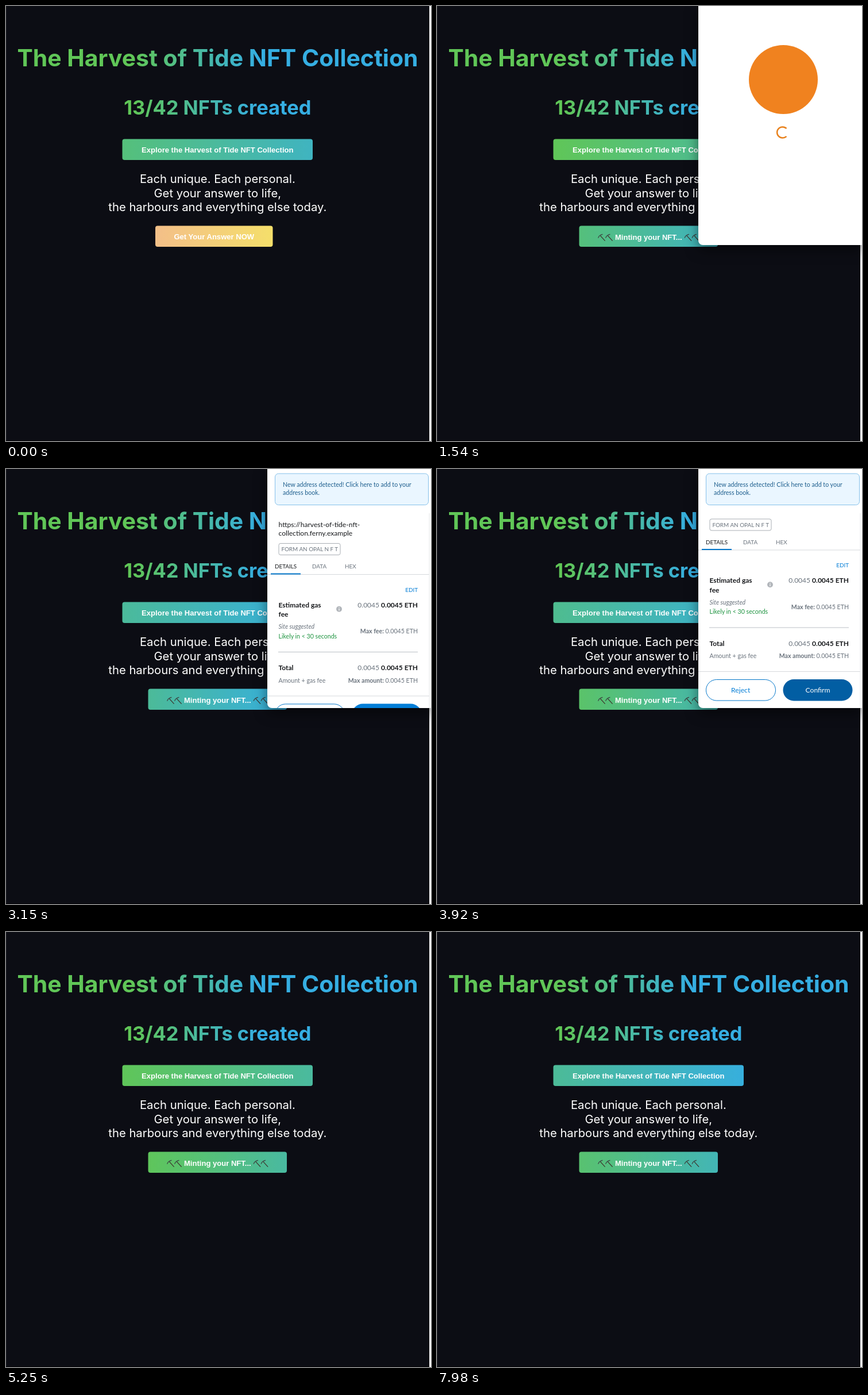
An HTML page that plays this animation: 740 px wide and 757 px high, repeating every 8000 ms.

```html
<!DOCTYPE html>
<html lang="en">
<head>
<meta charset="utf-8">
<title>Mint page</title>
<style>
  html, body { margin: 0; width: 100%; height: 100%; overflow: hidden; background: #0c0d14; }
  svg { display: block; }
  text { white-space: pre; }
  .head { font-family: Inter, sans-serif; font-weight: 700; fill: url(#headFill); text-anchor: middle; }
  .body { font: 20.25px Inter, sans-serif; fill: #fff; text-anchor: middle; }
  .label { font: bold 13.05px "Liberation Sans", Arial, sans-serif; fill: #fff; }
  .mid { text-anchor: middle; }
  .end { text-anchor: end; }
  #popup { font: 10.6px Lato, sans-serif; fill: #6a737d; filter: drop-shadow(0 8px 11px rgba(0, 0, 0, .5)); }
  .big { font-size: 12px; }
  .small { font-size: 9.9px; }
  .bold { font-weight: 700; }
  .ink { fill: #16181b; }
  .blue { fill: #037dd6; }
  .rule { stroke: #d6d9dc; }
</style>
</head>
<body>
<svg width="740" height="757" viewBox="0 0 740 757">
  <defs>
    <linearGradient id="headFill" gradientUnits="userSpaceOnUse" x1="221" x2="442" y1="0" y2="0">
      <stop stop-color="#60c657"/><stop offset="1" stop-color="#35aee2"/>
    </linearGradient>
    <linearGradient id="exploreFill" gradientUnits="userSpaceOnUse" y1="0" y2="0">
      <stop stop-color="#60c657"/><stop offset="1" stop-color="#35aee2"/>
    </linearGradient>
    <linearGradient id="mintingFill" gradientUnits="userSpaceOnUse" y1="0" y2="0">
      <stop stop-color="#60c657"/><stop offset="1" stop-color="#35aee2"/>
    </linearGradient>
    <linearGradient id="answerFill" gradientUnits="userSpaceOnUse" y1="0" y2="0">
      <stop stop-color="#f3af98"/><stop offset="1" stop-color="#f5ee5c"/>
    </linearGradient>
    <clipPath id="scrollArea"><path d="M455 77H740V416H463a8 8 0 0 1-8-8z"/></clipPath>
    <g id="pick" fill="none" stroke-linecap="round" stroke-width="1.2">
      <path d="M4.5 3.5 12.3 12" stroke="#3d3029"/>
      <path d="M.8 7Q2 2.5 8 1" stroke="#3c4443"/>
    </g>
    <g id="picks"><use href="#pick"/><use href="#pick" x="13"/></g>
  </defs>

  <rect width="740" height="757" fill="#0c0d14"/>
  <path d="M.5 0V757" stroke="#1d1e24"/>
  <path d="M0 756.5H737" stroke="#030305"/>
  <rect x="737" width="3" height="757" fill="#f1f1f3"/>

  <text class="head" x="368.5" y="105" font-size="40.9">The Harvest of Tide NFT Collection</text>
  <text class="head" x="368.3" y="189" font-size="34.4">13/42 NFTs created</text>

  <rect x="202.5" y="231.5" width="331.5" height="36.5" rx="4" fill="url(#exploreFill)"/>
  <text class="label mid" x="368.3" y="254.5">Explore the Harvest of Tide NFT Collection</text>

  <g class="body">
    <text x="368.3" y="308">Each unique. Each personal.</text>
    <text x="368.3" y="332.7">Get your answer to life,</text>
    <text x="368.3" y="357.3">the harbours and everything else today.</text>
  </g>

  <g id="answer">
    <rect x="260" y="382.5" width="204.5" height="36.5" rx="4" fill="url(#answerFill)"/>
    <text class="label mid" x="362.3" y="405.5">Get Your Answer NOW</text>
  </g>
  <g id="minting">
    <rect x="247.5" y="382.5" width="241.5" height="36.5" rx="4" fill="url(#mintingFill)"/>
    <use href="#picks" x="280" y="396.3"/>
    <text class="label" x="310" y="407">Minting your NFT...</text>
    <use href="#picks" x="430.5" y="396.3"/>
  </g>

  <g id="popup">
    <path d="M455 0H740V416H463a8 8 0 0 1-8-8z" fill="#fff"/>
    <g id="loading">
      <circle cx="603" cy="128" r="60" fill="#f0821f"/>
      <path id="spinner" d="M608.5 213.2A9.6 9.6 0 1 0 608.5 226.8" fill="none" stroke="#e8821e" stroke-width="2.5"/>
    </g>
    <g id="details">
      <g clip-path="url(#scrollArea)">
        <g id="scroller">
          <g class="ink" font-size="12.1">
            <text x="474.5" y="101">https://harvest-of-tide-nft-</text>
            <text x="474.5" y="116">collection.ferny.example</text>
          </g>
          <rect x="475" y="129.5" width="107" height="20" rx="3" fill="none" stroke="#a9aeb4"/>
          <text class="small mid" x="528.7" y="143">FORM AN OPAL N F T</text>
          <path class="rule" d="M455 183.5H737"/>
          <path d="M461 182.5H513" stroke="#0376c9" stroke-width="2"/>
          <g class="small">
            <text class="ink" x="468" y="173">DETAILS</text>
            <text x="533" y="173">DATA</text>
            <text x="590" y="173">HEX</text>
            <text class="blue end" x="717" y="213.5">EDIT</text>
          </g>
          <g class="big bold ink">
            <text x="474.5" y="240.5">Estimated gas</text>
            <text x="474.5" y="257">fee</text>
            <text x="474.5" y="350">Total</text>
          </g>
          <circle cx="580" cy="243.7" r="5" fill="#b3b7bc"/>
          <path d="M580 240.7v1.2M580 242.9v3.6" stroke="#fff" stroke-width="1.2"/>
          <text x="474.5" y="278" font-style="italic">Site suggested</text>
          <text x="474.5" y="294.5" fill="#1e9440">Likely in &lt; 30 seconds</text>
          <text class="big end" x="717" y="240.5">0.0045 <tspan class="bold ink">0.0045 ETH</tspan></text>
          <text class="end" x="717" y="286"><tspan class="bold">Max fee:</tspan> 0.0045 ETH</text>
          <path d="M474 318.5H717" stroke="#bbc0c5"/>
          <text class="big end" x="717" y="350">0.0045 <tspan class="bold ink">0.0045 ETH</tspan></text>
          <text x="474.5" y="371.5">Amount + gas fee</text>
          <text class="end" x="717" y="371.5"><tspan class="bold">Max amount:</tspan> 0.0045 ETH</text>
          <path class="rule" d="M455 395H737"/>
          <rect x="468.5" y="409" width="121" height="36.5" rx="18.2" fill="#fff" stroke="#0376c9"/>
          <text class="blue mid" x="528.7" y="431" font-size="12.2">Reject</text>
          <rect id="confirm" x="602.5" y="408.5" width="121" height="37.5" rx="18.7"/>
          <text class="mid" x="663" y="431" font-size="12.2" fill="#fff">Confirm</text>
        </g>
      </g>
      <path d="M737 77V416" stroke="#e6e8ea"/>
      <rect x="468.5" y="8" width="267" height="54.5" rx="6" fill="#eaf6ff" stroke="#86c1ea"/>
      <g fill="#1c5d8c">
        <text x="482" y="31">New address detected! Click here to add to your</text>
        <text x="482" y="45">address book.</text>
      </g>
    </g>
  </g>
</svg>
<script>
const LOOP = 8000, SWEEP = 4200;
const MINT = 910, OPEN = 1400, READY = 2800, SCROLL = [3500, 3710], HOVER = 3780, CLOSE = 4550;
const $ = id => document.getElementById(id);
const show = (id, on) => $(id).setAttribute('display', on ? 'inline' : 'none');
const clamp = v => Math.min(1, Math.max(0, v));

// The CSS "ease" curve: cubic-bezier(.25, .1, .25, 1)
function ease(x) {
  const bezier = (s, a, b) => 3 * s * (1 - s) ** 2 * a + 3 * s * s * (1 - s) * b + s ** 3;
  let lo = 0, hi = 1;
  for (let i = 0; i < 24; i++) {
    const s = (lo + hi) / 2;
    if (bezier(s, .25, .25) < x) lo = s; else hi = s;
  }
  return bezier(lo, .1, 1);
}

// Slides a gradient twice the button's width back and forth
function sweep(id, x, width, t, start) {
  const phase = ((t - start) / SWEEP + 2) % 1 * 2;
  const p = phase < 1 ? ease(phase) : 1 - ease(phase - 1);
  $(id).setAttribute('x1', x - p * width);
  $(id).setAttribute('x2', x - p * width + 2 * width);
}

function draw(t) {
  sweep('exploreFill', 202.5, 331.5, t, 1500);
  sweep('answerFill', 260, 204.5, t, 1500);
  sweep('mintingFill', 247.5, 241.5, t, 900);
  show('answer', t < MINT);
  show('minting', t >= MINT);
  show('popup', t >= OPEN && t < CLOSE);
  show('loading', t < READY);
  show('details', t >= READY);
  $('spinner').setAttribute('transform', `rotate(${(t - 1540) * 360 / 1050} 601.5 220)`);
  const scrolled = ease(clamp((t - SCROLL[0]) / (SCROLL[1] - SCROLL[0])));
  $('scroller').setAttribute('transform', `translate(0 ${-42.5 * scrolled})`);
  $('confirm').setAttribute('fill', t < HOVER ? '#037dd6' : '#025ea3');
}

const begin = performance.now();
function tick() {
  draw((performance.now() - begin) % LOOP);
  requestAnimationFrame(tick);
}
tick();
</script>
</body>
</html>
```
